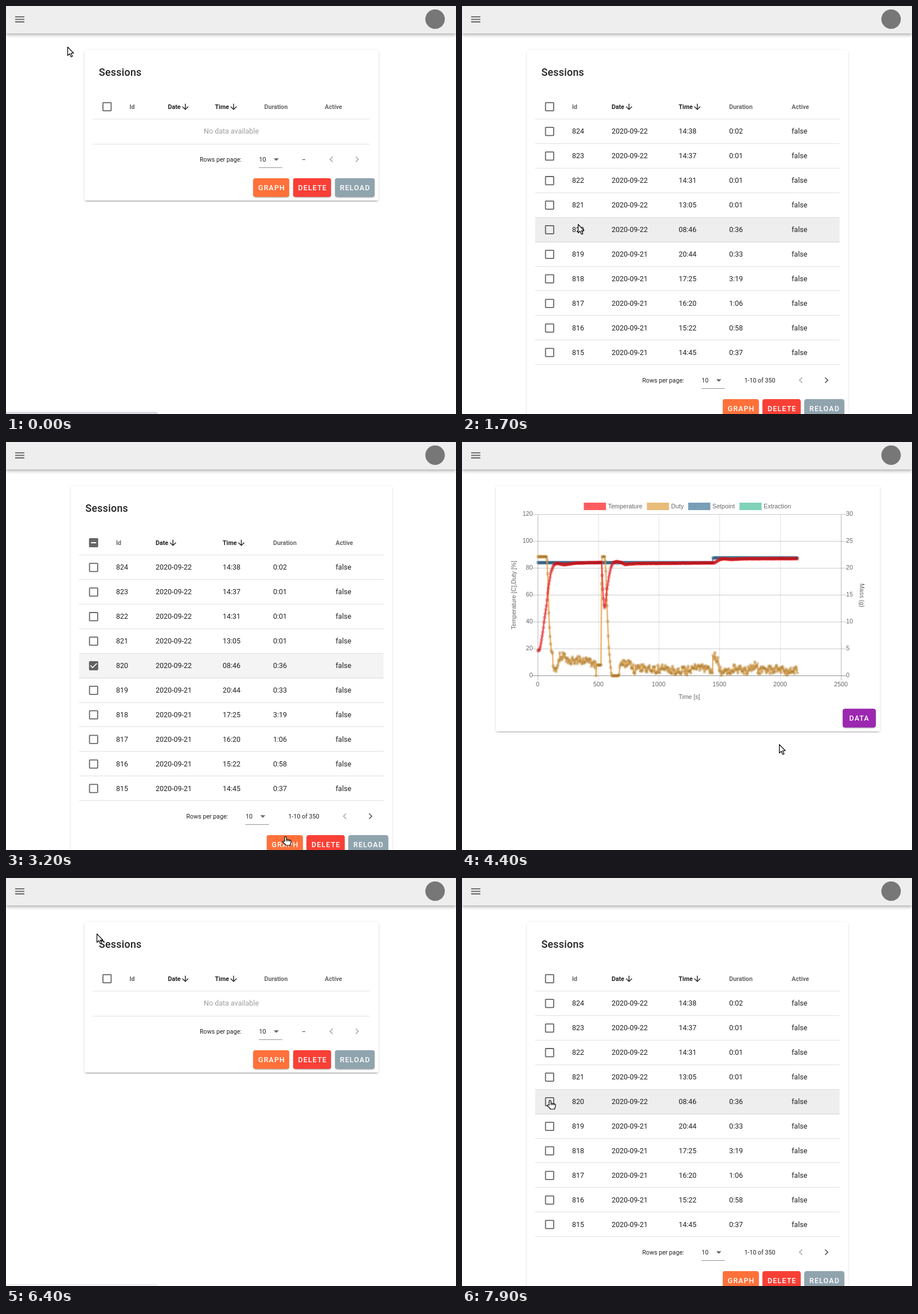
An HTML page with a canvas that plays this animation: 785x713 px, repeating every 8 s.

```html
<!DOCTYPE html>
<html lang="en">
<head>
<meta charset="utf-8">
<title>Sessions</title>
<style>
  html, body { margin: 0; width: 100%; height: 100%; overflow: hidden; background: #fff; }
  canvas { display: block; }
</style>
</head>
<body>
<canvas id="stage" width="785" height="713"></canvas>
<script>
const ctx = document.getElementById('stage').getContext('2d');
const LOOP = 8000, STEP = 100;
const ROBOTO = 'Roboto, sans-serif', ARIAL = '"Liberation Sans", Arial, sans-serif';
const INK = 'rgba(0,0,0,.87)', SOFT = 'rgba(0,0,0,.6)', FAINT = 'rgba(0,0,0,.38)';

// 24 x 24 icon outlines
const BOX = 'M19,3H5C3.9,3 3,3.9 3,5V19A2,2 0 0,0 5,21H19A2,2 0 0,0 21,19V5C21,3.9 20.1,3 19,3Z';
const ICON = {
  menu: 'M3,6H21V8H3ZM3,11H21V13H3ZM3,16H21V18H3Z',
  open: BOX + 'M19,5V19H5V5H19Z',
  checked: BOX + 'M10,17L5,12L6.41,10.58L10,14.17L17.59,6.58L19,8Z',
  partial: BOX + 'M17,13H7V11H17Z',
  sort: 'M11,4H13V16L18.5,10.5L19.92,11.92L12,19.84L4.08,11.92L5.5,10.5L11,16Z',
  drop: 'M7,10L12,15L17,10Z',
  prev: 'M15.41,16.58L10.83,12L15.41,7.41L14,6L8,12L14,18Z',
  next: 'M8.59,16.58L13.17,12L8.59,7.41L10,6L16,12L10,18Z'
};
for (const k in ICON) ICON[k] = new Path2D(ICON[k]);
const ARROW = new Path2D('M.6,.6V15.6L4,12.4L6.5,18L8.9,17L6.4,11.5H11Z');
const HAND = new Path2D('M4,9V2.2a1.6,1.6 0 0 1 3.2,0V6q1.4,-.8 2.6,.2q1.5,-.6 2.6,.5q2.2,-.2 2.6,1.3V11q0,2 -1.4,3.5V16H6V15L.8,10q-.3,-1.7 1.4,-1.5Z');

// y offset, blur, spread, alpha
const RAISED = [[2.7, .9, -1.8, .2], [1.8, 1.8, 0, .14], [.9, 4.5, 0, .12]];
const BAR = [[1.8, 3.6, -.9, .2], [3.6, 4.5, 0, .14], [.9, 9, 0, .12]];

const TIMES = ['14:38', '14:37', '14:31', '13:05', '08:46', '20:44', '17:25', '16:20', '15:22', '14:45'];
const DURATIONS = ['0:02', '0:01', '0:01', '0:01', '0:36', '0:33', '3:19', '1:06', '0:58', '0:37'];
const ROW_TOP = 198, ROW_H = 42.92, PICKED = 4;

// time, x, y of the pointer tip
const POINTER = [
  [0, 107, 71], [500, 107, 71], [900, 230, 84], [1300, 376, 120], [1400, 384, 141], [1500, 335, 195],
  [1700, 202, 381], [2000, 165, 390], [2200, 153, 388], [2400, 153, 388], [2800, 330, 540],
  [3200, 487, 689], [3300, 487, 689], [3800, 540, 560], [4100, 553, 528], [5000, 553, 528],
  [5400, 671, 508], [5600, 672, 488], [5900, 160, 97], [6000, 158, 97], [6800, 158, 97],
  [7000, 168, 89], [7300, 178, 638], [7700, 140, 387], [7800, 153, 388]
];

// seconds, value
const TEMPERATURE = [
  [0, 21], [12, 21.5], [21, 25], [31, 31], [43, 38.5], [52, 47], [72, 60], [82, 72], [107, 87], [130, 93],
  [155, 94.6], [215, 93.2], [310, 94.6], [525, 95.2], [532, 80], [537, 68], [548, 56.3], [555, 59],
  [570, 73], [587, 84], [602, 91], [620, 95], [650, 96], [690, 95], [720, 93.4], [800, 94.2],
  [1455, 94.8], [1500, 97.6], [1530, 98.2], [1600, 97.7], [1700, 98.2], [2140, 98.4]
];
const DUTY = [
  [0, 100], [74, 100], [84, 76], [92, 45], [102, 30], [110, 21], [120, 19], [125, 8], [150, 6], [180, 16],
  [215, 18], [240, 13], [380, 13], [440, 10], [475, 10], [480, 0], [485, 9], [522, 9], [526, 100],
  [553, 100], [560, 88], [572, 53], [583, 26], [595, 12], [607, 0], [662, 0], [675, 7], [710, 10],
  [765, 9], [800, 5], [850, 7], [950, 4.5], [1050, 7], [1130, 4], [1220, 4], [1330, 7], [1440, 4],
  [1446, 18], [1486, 12], [1500, 4], [1540, 2.5], [1620, 6], [1740, 4], [1790, 9], [1830, 4],
  [1970, 5.5], [2060, 4], [2140, 5.5]
];
const SETPOINT = [[0, 95], [1440, 95], [1445, 99], [2140, 99]];

function tween(keys, t, col = 1) {
  const i = keys.findIndex(k => k[0] > t);
  if (i < 0) return keys[keys.length - 1][col];
  const a = keys[i - 1], b = keys[i];
  return a[col] + (b[col] - a[col]) * (t - a[0]) / (b[0] - a[0]);
}

function sample(keys, noise = 0) {
  return Array.from({ length: 429 }, (_, i) => {
    const s = i * 5, r = Math.abs(Math.sin(i * 127.1) * 43758.5) % 1;
    const calm = s < 125 || (s > 475 && s < 665);
    return [s, Math.max(0, tween(keys, s) + (calm ? 0 : (r * 2 - 1) * noise))];
  });
}

const SERIES = [
  { name: 'Temperature', x: 212.5, rgb: '255,30,36', key: '#ff5c5f', data: sample(TEMPERATURE, .15) },
  { name: 'Duty', x: 322.5, rgb: '224,159,63', key: '#e9bc79', data: sample(DUTY, 3.6) },
  { name: 'Setpoint', x: 394.5, rgb: '62,116,154', key: '#789eb8', data: sample(SETPOINT) },
  { name: 'Extraction', x: 484, rgb: '50,180,145', key: '#80d2b9', data: [] }
];

function text(str, x, y, { size = 12.5, weight = 400, color = INK, family = ROBOTO, align = 'left', spacing = 0 } = {}) {
  ctx.font = `${weight} ${size}px ${family}`;
  ctx.letterSpacing = spacing + 'px';
  ctx.textAlign = align;
  ctx.fillStyle = color;
  ctx.fillText(str, x, y);
}

function rect(x, y, w, h, color) {
  ctx.fillStyle = color;
  ctx.fillRect(x, y, w, h);
}

function icon(name, cx, cy, color = SOFT, size = 21.4) {
  ctx.save();
  ctx.translate(cx - size / 2, cy - size / 2);
  ctx.scale(size / 24, size / 24);
  ctx.fillStyle = color;
  ctx.fill(ICON[name], 'evenodd');
  ctx.restore();
}

function panel(x, y, w, h, color, shadows = RAISED, radius = 3.6) {
  ctx.fillStyle = color;
  const fill = grow => {
    ctx.beginPath();
    ctx.roundRect(x - grow, y - grow, w + 2 * grow, h + 2 * grow, radius);
    ctx.fill();
  };
  for (const [dy, blur, spread, alpha] of shadows) {
    ctx.save();
    ctx.shadowColor = `rgba(0,0,0,${alpha})`;
    ctx.shadowOffsetY = dy;
    ctx.shadowBlur = blur;
    fill(spread);
    ctx.restore();
  }
  fill(0);
}

function button(label, x, y, w, color, pad = 8.5) {
  panel(x, y, w, 32, color);
  text(label, x + pad, Math.round(y + 20.3), { weight: 500, color: '#fff', spacing: 1.115 });
}

function drawBar() {
  panel(0, 0, 785, 48, '#eee', BAR, 0);
  icon('menu', 24, 23.3, SOFT);
  ctx.fillStyle = '#777';
  ctx.beginPath();
  ctx.arc(748.5, 23, 17, 0, 7);
  ctx.fill();
}

function drawSessions(loaded, checked, hover) {
  const dx = loaded ? -23.5 : 0, dy = loaded ? 386 : 0;
  const left = 151 + dx, width = 484 - 2 * dx, boxX = 176.3 + dx;
  const cols = loaded ? [192, 261, 378, 466, 575] : [215.5, 282.5, 364.5, 450.5, 556];
  const small = { size: 10.7 };

  panel(137 + dx, 77, 513 - 2 * dx, loaded ? 660 : 263, '#fff');
  text('Sessions', 162 + dx, 122, { size: 17.86, weight: 500, spacing: .22 });
  icon(checked ? 'partial' : 'open', boxX, 176);
  ['Id', 'Date', 'Time', 'Duration', 'Active'].forEach((name, i) => {
    const sorted = i === 1 || i === 2;
    text(name, cols[i], 180, { size: 10.7, weight: 700, color: sorted ? INK : SOFT });
    if (sorted) icon('sort', cols[i] + (i === 1 ? 30.3 : 32.5), 176.3, INK, 17);
  });
  rect(left, 197, width, 1, 'rgba(0,0,0,.12)');

  if (loaded) TIMES.forEach((time, i) => {
    const top = ROW_TOP + i * ROW_H, mid = top + 21;
    const picked = checked && i === PICKED;
    const y0 = Math.round(top), y1 = Math.round(top + ROW_H);
    if (i === hover || picked) rect(left, y0, width, y1 - y0, i === hover ? '#eee' : '#f4f4f4');
    rect(left, y1 - 1, width, 1, 'rgba(0,0,0,.12)');
    icon(picked ? 'checked' : 'open', boxX, mid + .3);
    const cells = [824 - i, i < 5 ? '2020-09-22' : '2020-09-21', time, DURATIONS[i], 'false'];
    cells.forEach((cell, c) => text(cell, cols[c], Math.round(mid + 4.4)));
  });
  else {
    text('No data available', 393, 223, { color: FAINT, align: 'center' });
    rect(left, 241, width, 1, 'rgba(0,0,0,.12)');
  }

  text('Rows per page:', 338 + dx, 272 + dy, small);
  text('10', 441.5 + dx, 272 + dy, small);
  icon('drop', 471.5 + dx, 268 + dy);
  rect(441 + dx, 282 + dy, 41, 1, 'rgba(0,0,0,.42)');
  text(loaded ? '1-10 of 350' : '–', 516 + dx, 272 + dy, small);
  icon('prev', 567.5 - dx, 268 + dy, 'rgba(0,0,0,.3)');
  icon('next', 612.3 - dx, 268 + dy, loaded ? SOFT : 'rgba(0,0,0,.3)');
  button('GRAPH', 431.5 - dx, 301.3 + dy, 62.5, '#ff713a');
  button('DELETE', 501 - dx, 301.3 + dy, 66, '#f94036');
  button('RELOAD', 574 - dx, 301.3 + dy, 69, '#90a4ae');
}

function turned(str, x, y, angle, style) {
  ctx.save();
  ctx.translate(x, y);
  ctx.rotate(angle);
  text(str, 0, 4, style);
  ctx.restore();
}

function drawChart(grow) {
  const px = s => 132.5 + s * .2114, py = v => 408.5 - v * 2.346;
  const style = (align = 'left') => ({ size: 10.7, color: '#666', family: ARIAL, align });

  panel(59, 77, 670, 428.5, '#fff');
  for (const { name, x, key } of SERIES) {
    rect(x, 106, 38.7, 13, key);
    text(name, x + 42.3, 116, style());
  }
  for (let i = 0; i <= 6; i++) {
    const y = Math.floor(py(i * 20));
    rect(123, y, 547, 1, i ? 'rgba(0,0,0,.2)' : 'rgba(0,0,0,.42)');
    text(i * 20, 123.5, y + 3, style('right'));
    text(i * 5, 670, y + 3, style());
  }
  for (let i = 0; i <= 5; i++) {
    const x = Math.floor(px(i * 500));
    rect(x, 127, 1, 290, i % 5 ? 'rgba(0,0,0,.11)' : 'rgba(0,0,0,.28)');
    text(i * 500, x, 427, style('center'));
  }
  text('Time [s]', 396.5, 449, style('center'));
  turned('Temperature [C],Duty [%]', 90, 267.5, -Math.PI / 2, style('center'));
  turned('Mass (g)', 698, 268, Math.PI / 2, style('center'));

  for (const { rgb, data } of [...SERIES].reverse()) {
    const points = data.map(([s, v]) => [px(s), py(v * grow)]);
    ctx.lineWidth = 2.7;
    ctx.lineJoin = 'round';
    ctx.strokeStyle = `rgba(${rgb},.7)`;
    ctx.beginPath();
    points.forEach(p => ctx.lineTo(...p));
    ctx.stroke();
    ctx.lineWidth = .9;
    ctx.strokeStyle = `rgba(${rgb},.5)`;
    ctx.fillStyle = 'rgba(0,0,0,.1)';
    for (const [x, y] of points) {
      ctx.beginPath();
      ctx.arc(x, y, 2.7, 0, 7);
      ctx.fill();
      ctx.stroke();
    }
  }
  button('DATA', 664.5, 466.5, 57, '#9c27b0', 11);
}

function drawStatus(color) {
  ctx.fillStyle = color;
  ctx.beginPath();
  ctx.roundRect(-5, 709, 270, 10, 3.5);
  ctx.fill();
}

function drawPointer(x, y, hand) {
  ctx.save();
  ctx.translate(hand ? x - 5 : x, y);
  ctx.fillStyle = '#fff';
  ctx.strokeStyle = '#000';
  ctx.lineWidth = 1.2;
  ctx.lineJoin = 'round';
  const shape = hand ? HAND : ARROW;
  ctx.fill(shape);
  ctx.stroke(shape);
  if (hand) {
    ctx.beginPath();
    for (const fx of [7.2, 9.8, 12.4]) {
      ctx.moveTo(fx, 6.5);
      ctx.lineTo(fx, 9);
    }
    ctx.stroke();
  }
  ctx.restore();
}

function viewAt(t) {
  if (t < 200 || (t >= 6000 && t < 6600)) return 'empty';
  if (t < 3300 || t >= 6600) return 'table';
  return t < 4200 ? 'blank' : 'chart';
}

function draw(t) {
  const view = viewAt(t), x = tween(POINTER, t, 1), y = tween(POINTER, t, 2);
  let hand = false;
  rect(0, 0, 785, 713, '#fff');
  drawBar();

  if (view === 'chart') {
    drawChart(1 - (1 - Math.min(1, (t - 3980) / 1000)) ** 4);
    hand = x > 664 && y > 466 && y < 498;
  } else if (view !== 'blank') {
    const loaded = view === 'table';
    const row = Math.floor((y - ROW_TOP) / ROW_H);
    const inRows = loaded && x > 128 && x < 658 && row >= 0 && row < 10;
    drawSessions(loaded, t >= 2400 && t < 3300, inRows ? row : -1);
    const offset = y - (ROW_TOP + row * ROW_H + 21);
    hand = loaded && (y > 687 || (inRows && Math.abs(x - 152.5) < 10 && Math.abs(offset) < 10));
  }

  if (t < 200 || (t >= 3400 && t < 4000) || (t >= 6100 && t < 6400)) drawStatus('#dcdde4');
  else if (t < 300 || (t >= 6400 && t < 6600)) drawStatus('#f3f3f5');
  drawPointer(x, y, hand);
}

const start = performance.now();
function tick() {
  const t = (performance.now() - start) % LOOP;
  draw(Math.floor(t / STEP) * STEP);
  requestAnimationFrame(tick);
}
tick();
</script>
</body>
</html>
```
